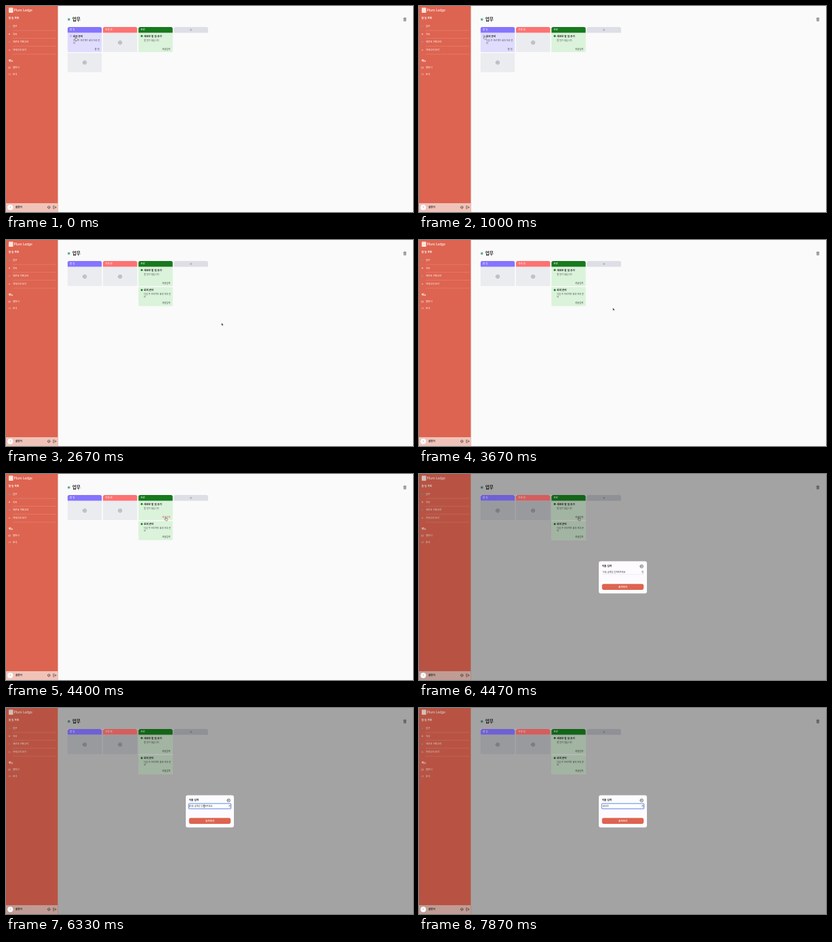
These frames come from a looping animation (600x304 px, 8000 ms). An HTML page:

```html
<!DOCTYPE html>
<html lang="ko">
<head>
<meta charset="utf-8">
<title>할 일 보드</title>
<style>
html, body { margin: 0; width: 100%; height: 100%; overflow: hidden; background: #fafafa; }
svg { display: block; width: 100vw; height: 100vh; }
text { font-family: 'Noto Sans CJK KR', 'Noto Sans CJK', 'Noto Sans', sans-serif; white-space: pre; }
.brand { font-family: Lato, sans-serif; }
</style>
</head>
<body>
<svg id="stage" viewBox="0 0 600 304"></svg>
<script>
const LOOP = 8000;
const NS = 'http://www.w3.org/2000/svg';
const stage = document.getElementById('stage');

function add(parent, tag, attrs = {}) {
  const el = document.createElementNS(NS, tag);
  for (const k in attrs) el.setAttribute(k, attrs[k]);
  return parent.appendChild(el);
}
const group = parent => add(parent, 'g');
const rect = (p, x, y, width, height, fill, rx = 0) => add(p, 'rect', { x, y, width, height, fill, rx });
const dot = (p, cx, cy, r, fill) => add(p, 'circle', { cx, cy, r, fill });
const line = (p, d, stroke, width = 0.6) =>
  add(p, 'path', { d, stroke, fill: 'none', 'stroke-width': width, 'stroke-linecap': 'round', 'stroke-linejoin': 'round' });

// Text is centred vertically on y; drawn large and scaled down to avoid minimum font sizes.
function label(p, x, y, str, size, fill, weight = 400, anchor = 'start') {
  const el = add(p, 'text', {
    transform: `translate(${x} ${y + size * 0.36}) scale(.1)`,
    'font-size': size * 10, fill, 'font-weight': weight, 'text-anchor': anchor
  });
  el.textContent = str;
  return el;
}
const show = (el, on) => el.setAttribute('visibility', on ? 'visible' : 'hidden');

function plus(p, x, y, r = 2.6, color = '#77797f') {
  line(p, `M${x - r} ${y}a${r} ${r} 0 1 0 ${2 * r} 0a${r} ${r} 0 1 0 ${-2 * r} 0M${x - r / 2} ${y}h${r}M${x} ${y - r / 2}v${r}`, color, r > 2 ? 0.55 : 0.35);
}
function header(p, x, fill, str) {
  add(p, 'path', { d: `M${x} 39.6v-6q0-2.6 2.6-2.6h45.2q2.6 0 2.6 2.6v6z`, fill });
  if (str) label(p, x + 3.3, 35.2, str, 3.5, '#fff', 500);
}
function slot(p, x, y) {
  const box = rect(p, x, y, 50.4, 28, '#ebecf0', 0.8);
  plus(p, x + 25.2, y + 14);
  return box;
}
function card(p, x, y, fill, title, lines, foot, done) {
  rect(p, x, y, 50.4, 28, fill, 0.8);
  if (done) dot(p, x + 4.8, y + 4.3, 1.5, '#17791d');
  else add(p, 'circle', { cx: x + 4.8, cy: y + 4.3, r: 1.3, fill: 'none', stroke: '#8474ff', 'stroke-width': 0.5 });
  label(p, x + 8, y + 4.2, title, 3.65, '#222', 700);
  lines.forEach((s, i) => label(p, x + 8, y + 10.4 + i * 4.1, s, 3.2, '#4c4c52'));
  return label(p, x + 46.8, y + 23.4, foot, 3.2, '#333', 400, 'end');
}

// Sidebar
rect(stage, 0, 0, 600, 304, '#fafafa');
rect(stage, 0, 0, 76.5, 304, '#dd6450');
rect(stage, 4, 2.5, 6.5, 7.5, '#ffe3dc', 0.8);
label(stage, 11.6, 6.2, 'Plum Ledge', 5.4, '#fff', 400).setAttribute('class', 'brand');
label(stage, 3.8, 17.8, '할 일 목록', 3.6, '#fff', 700);
[['업무', 29.8, '#5eb29b'], ['약속', 41.3, '#f3c5bb'], ['새로운 카테고리', 53, '#8a9cc9'], ['카테고리 보기', 64.8, '#f3a594']].forEach(([s, y, c]) => {
  dot(stage, 5, y + 0.2, 1.1, c);
  label(stage, 10, y, s, 3.5, '#fff', 500);
  line(stage, `M10 ${y + 6.3}H74`, '#eba293', 0.35);
});
label(stage, 3.8, 80.8, '메뉴', 3.6, '#fff', 700);
label(stage, 10, 91, '캘린더', 3.5, '#fff', 500);
label(stage, 10, 100.4, '분석', 3.5, '#fff', 500);
line(stage, 'M4 90h2.4v2.2h-2.4zM4 90.8h2.4M4 101.5v-1M5.2 101.5v-2.2M6.4 101.5v-1.5', '#f8d5cd', 0.4);
rect(stage, 0, 291, 76.5, 13, '#f0c3b9');
label(stage, 14, 297.2, '솔방이', 3.6, '#222', 700);
add(stage, 'circle', { cx: 63.2, cy: 297.1, r: 1.8, fill: 'none', stroke: '#333', 'stroke-width': 0.9, 'stroke-dasharray': '1.1 .3' });
dot(stage, 63.2, 297.1, 0.7, '#333');
line(stage, 'M71 295h-1.2v4.2h1.2M71.2 297.1h2.6M72.8 295.9l1.2 1.2l-1.2 1.2', '#333', 0.6);

// Board
rect(stage, 91, 18.3, 3.3, 3.3, '#57a892', 1);
label(stage, 97.8, 19.7, '업무', 6.6, '#222', 700);
line(stage, 'M586 18.2h4M587.2 18.2v-.8h1.6v.8M586.5 18.6v3.6h3v-3.6M587.5 19.5v1.8M588.5 19.5v1.8', '#555', 0.55);
header(stage, 90.8, '#8574fd', '할 일');
header(stage, 143, '#fd7272', '진행 중');
header(stage, 195.3, '#17791d', '완료');
header(stage, 247.5, '#dddee6');
plus(stage, 272.6, 35.3, 1.2, '#8e909a');
slot(stage, 143, 40);

const before = group(stage), after = group(stage);
const plan = ['다음 주 프로젝트 회의 자료 준', '비'];
card(before, 90.8, 40, '#e0dcfd', '회의 준비', plan, '할 일', false);
slot(before, 90.8, 69.4);
const freed = slot(after, 90.8, 40);
card(after, 195.3, 69.4, '#daf3da', '회의 준비', plan, '지출입력', true);
const expense = card(stage, 195.3, 40, '#daf3da', '새로운 할 일 추가', ['할 일이 많습니다'], '지출입력', true);

const pointerLayer = group(stage);

// Backdrop, lighter over coloured areas
const dim = group(stage);
const hole = (x, y, w, h) => `M${x} ${y}h${w}v${h}h${-w}z`;
const heads = [90.8, 143, 195.3].map(x => hole(x, 31, 50.4, 8.6)).join('');
const greens = hole(195.3, 40, 50.4, 57.4);
const shade = (d, opacity) => add(dim, 'path', { d, opacity, 'fill-rule': 'evenodd' });
shade(hole(76.5, 0, 523.5, 304) + heads + greens, 0.35);
shade(heads, 0.17);
shade(greens, 0.26);
shade(hole(0, 0, 76.5, 291), 0.17);
shade(hole(0, 291, 76.5, 13), 0.2);

dot(stage, 6.3, 297.2, 4, '#fff');
dot(stage, 6.3, 296.8, 0.8, '#a9a9ae');

// Dialog
const modal = group(stage);
rect(modal, 265, 128.8, 71, 47.4, '#fdfbff', 3);
label(modal, 269.8, 136, '지출 입력', 3.6, '#222', 700);
line(modal, 'M325.9 136.3a2.3 2.3 0 1 0 4.6 0a2.3 2.3 0 1 0 -4.6 0M327.4 135.5l1.6 1.6M329 135.5l-1.6 1.6', '#333', 0.6);
const underline = line(modal, 'M270 148.2H331', '#d5d5da', 0.4);
const focusRing = add(modal, 'rect', { x: 269.3, y: 141, width: 62.4, height: 7.8, rx: 0.8, fill: '#fff', stroke: '#477be4', 'stroke-width': 0.9 });
const field = label(modal, 270.8, 144.9, '', 3.15, '#333');
label(modal, 331, 144.9, '원', 3.1, '#333', 500, 'end');
const caret = rect(modal, 270.7, 143, 0.35, 3.8, '#111');
rect(modal, 269.8, 162.2, 61.4, 8.8, '#dd6450', 2.4);
label(modal, 300.5, 166.4, '추가하기', 3.5, '#fff', 700, 'middle');

// Pointers
const overLayer = group(stage);
const arrow = add(overLayer, 'path', { d: 'M0 0v3.6l.9-.8.6 1.4.7-.3-.6-1.3h1.1z', fill: '#111', stroke: '#fff', 'stroke-width': 0.25 });
const hand = add(pointerLayer, 'path', {
  d: 'M-.6 -1.2q.6-.7 1 0v1.6l1.6.4q.5.2.4.8l-.4 1.8h-2.6l-1.4-1.8q.1-.8.9-.4l.5.4z',
  fill: '#fff', stroke: '#222', 'stroke-width': 0.45
});
const beam = line(overLayer, 'M-.6 -2.1q.6 0 .6.5q0-.5.6-.5M0 -1.6v3.2M-.6 2.1q.6 0 .6-.5q0 .5.6.5', '#222', 0.4);

const path = [[0, 103, 47.5], [530, 103, 47.5], [1130, 96, 45.3], [1930, 96, 45.3], [2670, 317.8, 122.6],
  [3330, 317.8, 122.6], [4130, 235.8, 65.5], [4530, 235.8, 65.5], [5400, 292, 145], [LOOP, 292, 145]];
const keys = [6670, 6870, 7130, 7330, 7530];
const clamp = v => Math.max(0, Math.min(1, v));
const ease = v => v * v * (3 - 2 * v);

function pointerAt(t) {
  let i = 1;
  while (i < path.length - 1 && t > path[i][0]) i++;
  const [t0, x0, y0] = path[i - 1], [t1, x1, y1] = path[i];
  const k = ease(clamp((t - t0) / (t1 - t0)));
  return [x0 + (x1 - x0) * k, y0 + (y1 - y0) * k];
}

function draw(t) {
  const done = t >= 1400, open = t >= 4440, focused = t >= 5470;
  const [x, y] = pointerAt(t);
  show(before, !done);
  show(after, done);
  show(dim, open);
  show(modal, open);

  const hover = clamp((t - 1400) / 130) * (1 - clamp((t - 2060) / 130));
  const mix = (a, b) => Math.round(a + (b - a) * hover);
  freed.setAttribute('fill', `rgb(${mix(235, 196)},${mix(236, 198)},${mix(240, 207)})`);

  const onLink = !open && x > 229 && x < 244 && y > 61 && y < 67;
  expense.setAttribute('fill', onLink ? '#e23b35' : '#333');

  const typed = keys.filter(k => t >= k).length;
  field.textContent = typed ? '60000'.slice(0, typed) : '지출 금액을 입력해주세요';
  const blink = t < 5870 || (t >= 6130 && t < 6640) || (t >= keys[0] && t < 7870);
  caret.setAttribute('x', 270.7 + typed * 1.75);
  show(underline, open && !focused);
  show(focusRing, open && focused);
  show(caret, open && focused && blink);

  const overCard = x < 141.5 && y < 68;
  const isHand = overCard || onLink || (open && t < 4560);
  const isBeam = open && x > 270 && y > 141;
  for (const p of [arrow, hand, beam]) p.setAttribute('transform', `translate(${x} ${y})`);
  show(hand, isHand);
  show(beam, isBeam && !typed);
  show(arrow, !isHand && !isBeam);
}

const start = performance.now();
function tick() {
  draw((performance.now() - start) % LOOP);
  requestAnimationFrame(tick);
}
draw(0);
requestAnimationFrame(tick);
</script>
</body>
</html>
```
